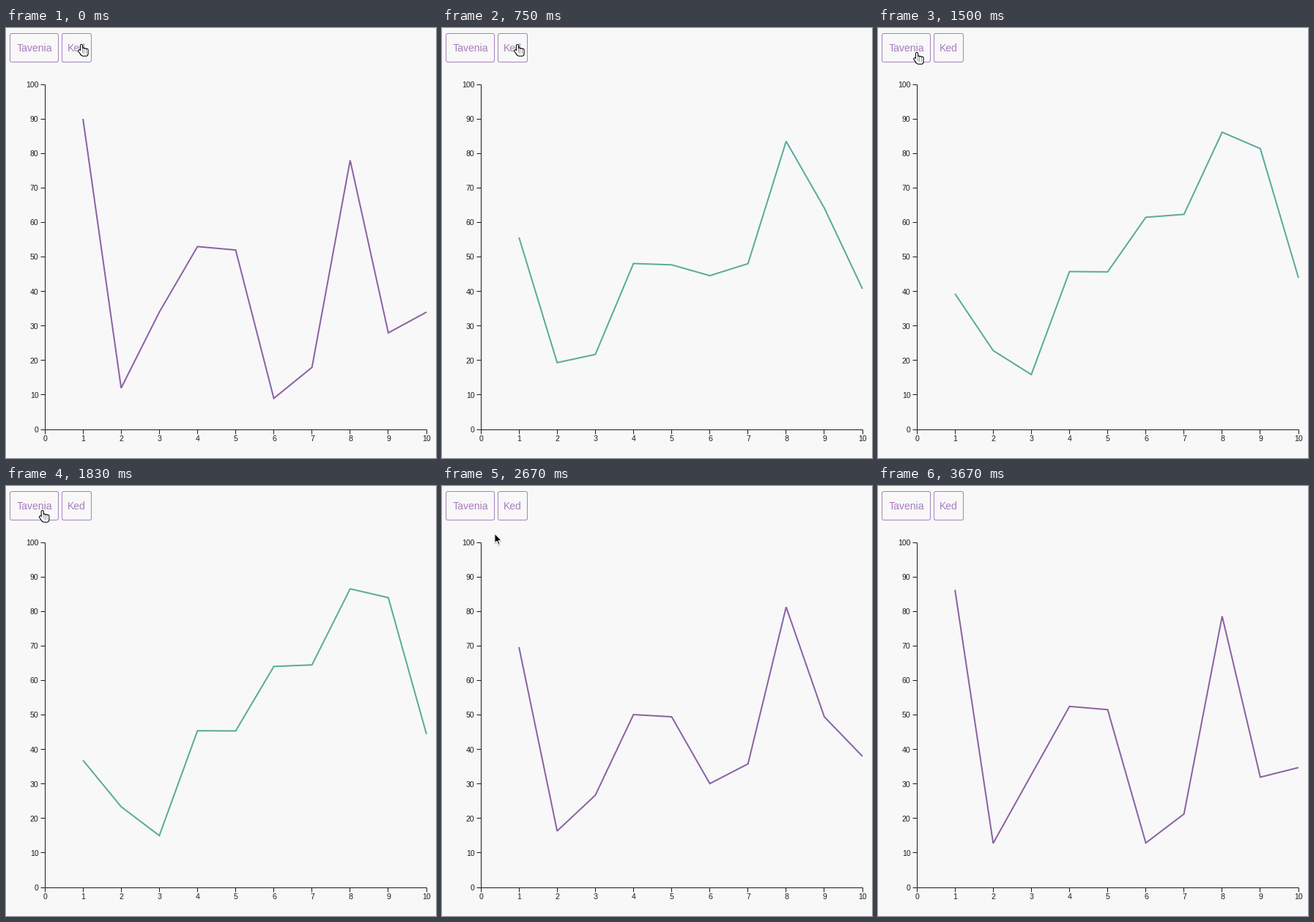
Recreate the animation shown at these times as a matplotlib script. Size 587 by 587 pixels, loop 3760 ms.

```python
import numpy as np
import matplotlib.pyplot as plt
from matplotlib.animation import FuncAnimation
from matplotlib.patches import FancyBboxPatch, Polygon

SIZE = 587
DPI = 100
PT = 72 / DPI  # points per pixel
LOOP_MS = 3760
STEP_MS = 20
FPS = 12  # the picture itself advances at this rate
LAST_STEP = 44

BG = "#f8f8f8"
INK = "#1c1c1c"
PURPLE = "#8b62a3"
GREEN = "#5aab9b"
BUTTON_EDGE = "#a584bd"
BUTTON_TEXT = "#a87dc0"

X0, X_UNIT = 53, 52.1
Y0, Y_UNIT = 548, 4.71
TICK = 6

FIRST = np.array([90, 12, 34, 53, 52, 9, 18, 78, 28, 34])
SECOND = np.array([34, 24, 14, 45, 45, 67, 67, 87, 87, 45])

# Click times in seconds and the decay rate of the ease-out that follows
CLICK_OUT, RATE_OUT = 0.242, 1.87
CLICK_BACK, RATE_BACK = 2.087, 1.69

# Pointer tip at a few moments: time, x, y
STOPS = np.array([
    (0.95, 103, 22), (1.5, 53, 33), (2.167, 46.5, 33),
    (2.667, 72, 65), (3.04, 330, 600),
])
ARROW = np.array([
    (0, 0), (0, 13), (3, 10.2), (5, 15), (7, 14.2), (5, 9.6), (9, 9.4),
])

fig = plt.figure(figsize=(SIZE / 100, SIZE / 100), dpi=DPI, facecolor=BG)
ax = fig.add_axes([0, 0, 1, 1])
ax.set_xlim(0, SIZE)
ax.set_ylim(SIZE, 0)
ax.axis("off")


def px(value):
    return X0 + X_UNIT * value


def py(value):
    return Y0 - Y_UNIT * value


def label(x, y, text, size, color, ha="center"):
    ax.text(x, y, text, family="Liberation Sans", fontsize=size * PT,
            color=color, ha=ha, va="baseline")


def rule(xs, ys):
    """One-pixel line through pixel centres."""
    ax.plot(np.floor(xs) + 0.5, np.floor(ys) + 0.5, color=INK, lw=PT,
            solid_capstyle="butt", snap=False)


def button(left, right, text):
    ax.add_patch(FancyBboxPatch(
        (left + 0.5, 7.5), right - left - 1, 39,
        boxstyle="round,pad=0,rounding_size=2.5",
        fc="none", ec=BUTTON_EDGE, lw=PT))
    label((left + right) / 2, 32, text, 14, BUTTON_TEXT)


def draw_axes():
    rule([X0, X0], [py(100), Y0])
    rule([X0, px(10)], [Y0, Y0])
    for i in range(11):
        x, y = px(i), py(10 * i)
        rule([X0 - TICK, X0], [y, y])
        rule([x, x], [Y0, Y0 + TICK])
        label(X0 - 8.5, y + 4, str(10 * i), 10.5, INK, "right")
        label(x + 0.5, 564, str(i), 10.5, INK)


def hand_strokes():
    """Four fingers, a thumb and a palm as separate strokes from the tip."""
    strokes = [[(2.5 * i, 6 + 0.6 * i if i else 2), (2.5 * i, 13.5)]
               for i in range(4)]
    strokes.append([(-2.8, 9.3), (0.8, 13.5)])
    strokes.append([(1.8, 14.7), (6.8, 14.7)])
    gap = (np.nan, np.nan)
    return np.array([p for s in strokes for p in (*s, gap)])


button(5, 72, "Tavenia")
button(76, 117, "Ked")
draw_axes()

curve, = ax.plot([], [], lw=2 * PT, solid_capstyle="butt",
                 solid_joinstyle="miter", zorder=4)
HAND = hand_strokes()
hand = [ax.plot([], [], color=color, lw=width * PT,
                solid_capstyle="round", snap=False, zorder=6)[0]
        for color, width in (("black", 4.2), ("white", 2.1))]
shadow = ax.add_patch(Polygon(ARROW, fc="black", ec="black", alpha=0.15,
                              lw=2 * PT, zorder=5))
arrow = ax.add_patch(Polygon(ARROW, fc="black", ec="white", lw=PT, zorder=6))


def blend(t):
    """Share of the second data set shown at time t."""
    reached = 1 - np.exp(-RATE_OUT * np.clip(t - CLICK_OUT, 0, CLICK_BACK - CLICK_OUT))
    return reached * np.exp(-RATE_BACK * max(t - CLICK_BACK, 0))


def move_pointer(t):
    tip = np.array([np.interp(t, STOPS[:, 0], STOPS[:, k]) for k in (1, 2)])
    over_button = tip[1] < 47
    for part in hand:
        part.set_visible(over_button)
        part.set_data(*(HAND + tip).T)
    for part, shift in ((arrow, 0), (shadow, 1)):
        part.set_visible(not over_button and tip[1] < SIZE)
        part.set_xy(ARROW + tip + (0, shift))


def update(i):
    seconds = (i + 0.5) * STEP_MS / 1000
    t = min(int((seconds + 0.004) * FPS), LAST_STEP) / FPS
    values = FIRST + (SECOND - FIRST) * blend(t)
    curve.set_data(px(np.arange(1, 11)), py(values))
    curve.set_color(GREEN if CLICK_OUT <= t < CLICK_BACK else PURPLE)
    move_pointer(t)
    return [curve, arrow, shadow, *hand]


anim = FuncAnimation(fig, update, frames=LOOP_MS // STEP_MS,
                     interval=STEP_MS, repeat=True, repeat_delay=0)
plt.show()
```
